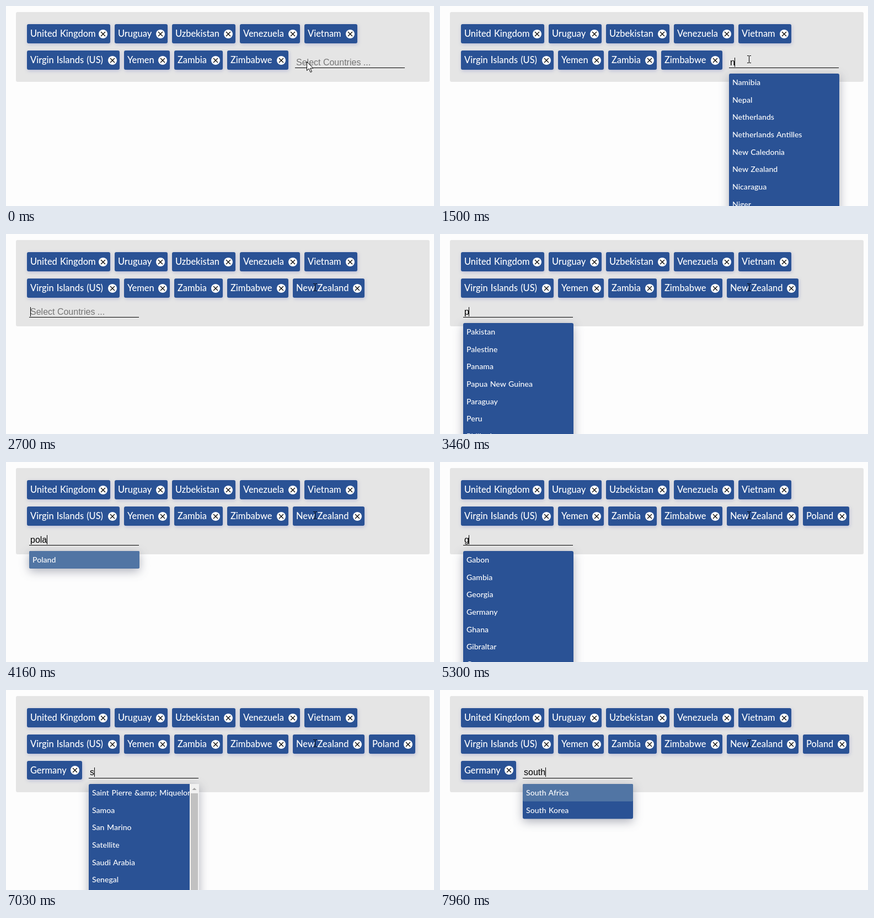
An HTML page for the animation above (8000 ms loop, 776 by 364 pixels).

```html
<!DOCTYPE html>
<html lang="en">
<head>
<meta charset="utf-8">
<title>Country picker</title>
<style>
  html, body { margin: 0; width: 100%; height: 100%; overflow: hidden; background: #fdfdfd; }
  svg { display: block; width: 776px; height: 364px; }
  text { white-space: pre; }
  .tag, .item { font-family: Lato, "Open Sans", sans-serif; font-weight: 500; fill: #fff; word-spacing: 1px; }
  .tag { font-size: 16.4px; }
  .item { font-size: 14.1px; }
  .input { font: 16px "Liberation Sans", Arial, sans-serif; }
</style>
</head>
<body>
<svg viewBox="0 0 776 364" xmlns="http://www.w3.org/2000/svg">
  <defs>
    <filter id="soft" x="-20%" y="-60%" width="140%" height="220%" color-interpolation-filters="sRGB">
      <feDropShadow dx="1" dy="2" stdDeviation="3" flood-color="#4a55b0" flood-opacity=".28"/>
    </filter>
    <filter id="deep" filterUnits="userSpaceOnUse" x="0" y="0" width="776" height="800" color-interpolation-filters="sRGB">
      <feDropShadow dx="0" dy="5" stdDeviation="9" flood-color="#30344e" flood-opacity=".38"/>
    </filter>
  </defs>
  <g id="scene"></g>
</svg>
<script>
const LOOP = 8000;
const BLUE = '#2a5295', ACTIVE = '#5175a4';
const ITEM_H = 31.7;

const countries = [
  'Gabon', 'Gambia', 'Georgia', 'Germany', 'Ghana', 'Gibraltar', 'Greece', 'Greenland',
  'Namibia', 'Nepal', 'Netherlands', 'Netherlands Antilles', 'New Caledonia', 'New Zealand',
  'Nicaragua', 'Niger', 'Nigeria', 'Norway',
  'Pakistan', 'Palestine', 'Panama', 'Papua New Guinea', 'Paraguay', 'Peru', 'Philippines',
  'Poland', 'Portugal', 'Puerto Rico',
  'Saint Pierre &amp; Miquelon', 'Samoa', 'San Marino', 'Satellite', 'Saudi Arabia',
  'Senegal', 'Serbia', 'Seychelles', 'South Africa', 'South Korea', 'Spain'
];

// Tags by row: [label, width]
const rows = [
  [['United Kingdom', 151], ['Uruguay', 96], ['Uzbekistan', 115], ['Venezuela', 109], ['Vietnam', 96]],
  [['Virgin Islands (US)', 168], ['Yemen', 83], ['Zambia', 88], ['Zimbabwe', 111], ['New Zealand', 130], ['Poland', 84]],
  [['Germany', 100]]
];
const rowBox = [{ y: 33, h: 35 }, { y: 81, h: 35 }, { y: 129, h: 34 }];

// Input positions as the tags wrap
const slots = [
  { x: 524, caret: 94, line: 112, list: 123, panel: 127 },
  { x: 42, caret: 133, line: 151, list: 162, panel: 157 },
  { x: 150, caret: 141, line: 160, list: 171, panel: 175 }
];

const key = (time, query) => [time, { query, caret: true, active: -1 }];
const blink = (time, caret) => [time, { caret }];
const mark = (time, active) => [time, { active }];
const pick = (time, tags, slot) => [time, { tags, slot, query: '', caret: true, active: -1 }];
const move = (time, x, y) => [time, { cursor: { x, y } }];

const steps = [
  [0, { tags: 9, slot: 0, query: '', caret: false, active: -1, cursor: null }],
  move(100, 551, 105), move(130, 557, 100), move(160, 560, 97),
  blink(330, true), blink(800, false), blink(1260, true),
  key(1500, 'n'), key(1660, 'ne'), key(1700, 'new'),
  mark(2130, 0), blink(2170, false), mark(2300, 1),
  pick(2700, 10, 1), blink(3160, false),
  key(3460, 'p'), key(3530, 'po'), key(3700, 'pol'), key(3760, 'pola'),
  mark(4160, 0), blink(4300, false),
  pick(4460, 11, 1), blink(5000, false),
  key(5300, 'g'), key(5360, 'ge'), key(5500, 'ger'),
  [6030, { active: 0, caret: false }],
  pick(6360, 12, 2), blink(6830, false),
  key(7030, 's'), key(7060, 'so'), key(7300, 'sou'), key(7380, 'sout'), key(7460, 'south'),
  mark(7960, 0)
];

const scene = document.getElementById('scene');
const pen = document.createElement('canvas').getContext('2d');
pen.font = '16px "Liberation Sans", Arial, sans-serif';

const escape = s => s.replace(/&/g, '&amp;').replace(/</g, '&lt;');
const rect = (x, y, w, h, fill, extra = '') =>
  `<rect x="${x}" y="${y}" width="${w}" height="${h}" fill="${fill}" ${extra}/>`;
const label = (x, y, cls, s, extra = '') =>
  `<text x="${x}" y="${y}" class="${cls}" ${extra}>${escape(s)}</text>`;
const stroke = (d, extra = '') => `<path d="${d}" fill="none" stroke="#000" ${extra}/>`;

function drawTag(name, x, w, { y, h }) {
  const cx = x + w - 13, cy = Math.ceil(y + h / 2);
  return rect(x, y, w, h, BLUE, 'rx="3" filter="url(#soft)"') +
    label(x + 6, y + 23, 'tag', name) +
    `<circle cx="${cx}" cy="${cy}" r="8" fill="#fff"/>` +
    stroke(`M${cx - 4} ${cy - 4}l8 8m0-8l-8 8`, 'stroke-width="1.2"');
}

function drawTags(count) {
  let out = '';
  rows.forEach((row, r) => {
    let x = 38;
    for (const [name, w] of row) {
      if (count-- <= 0) return;
      out += drawTag(name, x, w, rowBox[r]);
      x += w + 8;
    }
  });
  return out;
}

function drawInput({ query, caret }, slot) {
  const x = slot.x + 2, base = slot.caret + 14;
  let out = rect(slot.x, slot.line, 199, 1, '#000');
  out += query ? label(x, base, 'input', query, 'fill="#000"')
               : label(x, base, 'input', 'Select Countries ...', 'fill="#757575"');
  if (caret) out += rect(Math.floor(x + pen.measureText(query).width), slot.caret, 1, 17, '#000');
  return out;
}

function drawScrollbar(x, y) {
  return rect(x, y, 17, 400, '#f1f1f1') +
    `<path d="M${x + 4.5} ${y + 11}h8l-4-4z" fill="#a3a3a3"/>` +
    rect(x + 2, y + 17, 13, 400, '#c1c1c1');
}

function drawList({ query, active }, { x, list: y }) {
  if (!query) return '';
  const found = countries.filter(c => c.toLowerCase().startsWith(query));
  let out = rect(x, y, 200, found.length * ITEM_H, BLUE, 'rx="3" filter="url(#deep)"');
  found.forEach((name, i) => {
    const top = y + i * ITEM_H;
    if (i === active) out += rect(x, top, 200, ITEM_H, ACTIVE, 'rx="2"');
    out += label(x + 6, Math.round(top + 20.8), 'item', name);
  });
  return out + (query === 's' ? drawScrollbar(x + 183, y) : '');
}

function drawCursor(at) {
  if (!at) {
    return '<path d="M545.5 101.5v16l3.7-3.5 2.8 6.5 2.5-1-2.8-6.3h5.2z" fill="#fff" stroke="#000"/>';
  }
  return `<g transform="translate(${at.x} ${at.y})">` +
    stroke('M-3-6.5h3m1 0h3M.5-6v12M-3 6.5h3m1 0h3') + '</g>';
}

function draw(state) {
  const slot = slots[state.slot];
  scene.innerHTML = rect(18, 11, 750, slot.panel, '#e5e5e5', 'rx="3"') +
    drawTags(state.tags) + drawInput(state, slot) + drawList(state, slot) + drawCursor(state.cursor);
}

let shown = -1;
function tick() {
  const t = performance.now() % LOOP;
  const past = steps.filter(([time]) => time <= t);
  if (past.length !== shown) {
    shown = past.length;
    draw(Object.assign({}, ...past.map(([, change]) => change)));
  }
  requestAnimationFrame(tick);
}
tick();
</script>
</body>
</html>
```
